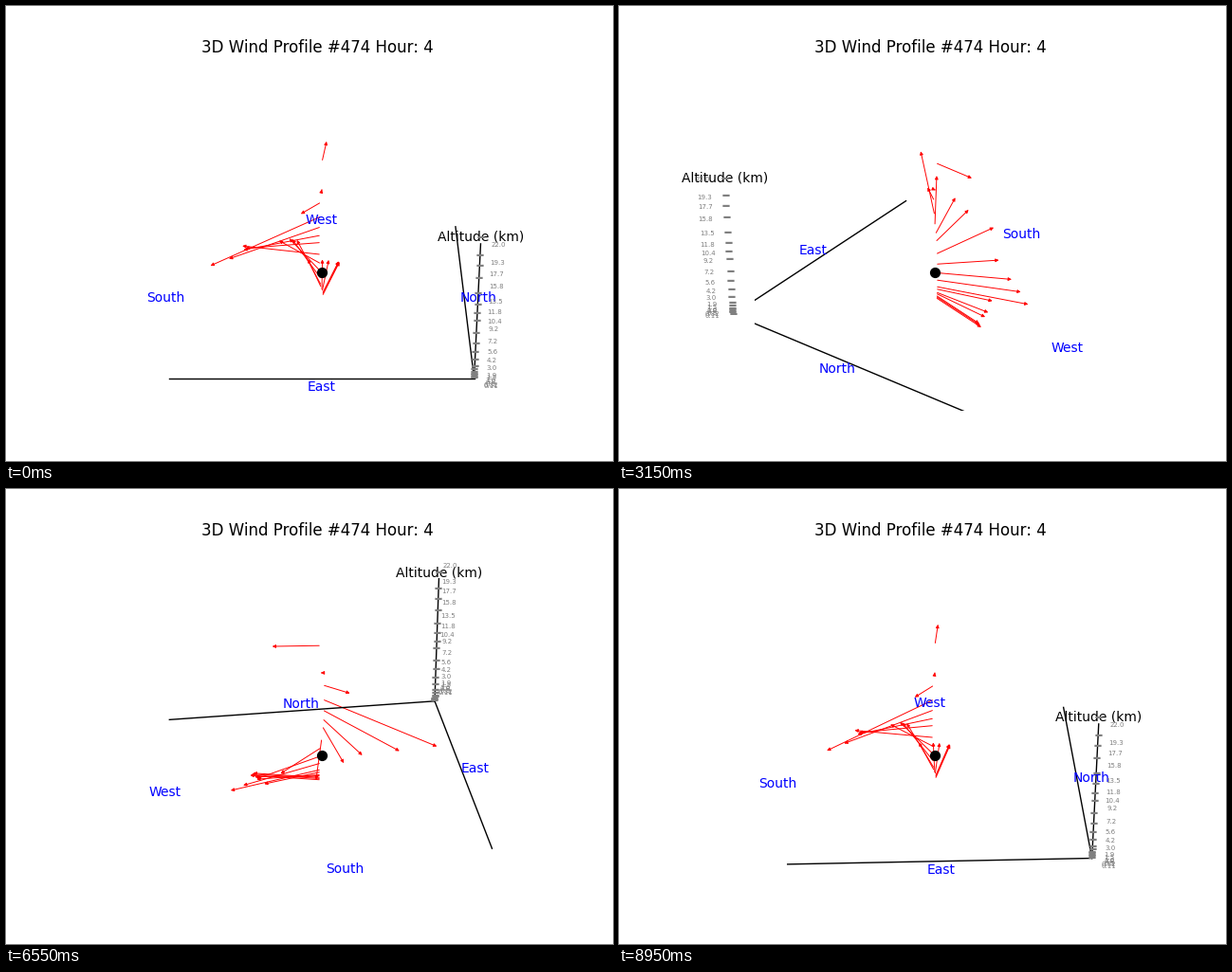
Recreate the animation shown at these times as a matplotlib script. Size 640 px wide and 480 px high, loop 9 s.

```python
import numpy as np
import matplotlib.pyplot as plt
from matplotlib.animation import FuncAnimation
from matplotlib.patches import FancyArrowPatch

FRAMES, INTERVAL = 180, 50
DIST, ELEV = 10, np.radians(30)
HALF = 0.767                      # half side of the ground square
RIM = 1.1 * HALF                  # distance of the labels
GROUND, PER_KM = -0.4139, 0.0374  # height of 0 km, and of each km

ALTS = [0.11, 0.32, 0.5, 0.8, 1.0, 1.5, 1.9, 3.0, 4.2, 5.6, 7.2, 9.2,
        10.4, 11.8, 13.5, 15.8, 17.7, 19.3, 22.0]
TOP = ALTS[-1]

# key points by altitude: the wind turns with height and peaks in the jet
SPEED = [(0, .41), (1.5, .345), (1.9, .54), (5.6, .36), (7.2, .45),
         (10, .41), (13.5, .77), (16.5, .01), (19.3, 0), (22, .27)]
HEADING = [(.5, 165), (1.5, 194), (5, 210), (7.2, 258), (12, 307),
           (15.8, 320), (17, 174)]


def wind(alt):
    """East and north parts of the wind."""
    speed = np.interp(alt, *zip(*SPEED))
    angle = np.radians(np.interp(alt, *zip(*HEADING)))
    return speed * np.cos(angle), speed * np.sin(angle)


def project(x, y, alt, azim):
    """Perspective view of a point, in axes units."""
    z = GROUND + PER_KM * alt
    toward = x * np.cos(azim) + y * np.sin(azim)
    right = y * np.cos(azim) - x * np.sin(azim)
    up = z * np.cos(ELEV) - toward * np.sin(ELEV)
    depth = DIST - toward * np.cos(ELEV) - z * np.sin(ELEV)
    return right / depth, up / depth


fig = plt.figure(figsize=(6.4, 4.8), dpi=100)
ax = fig.add_axes([0.22375, 0.11, 0.5775, 0.77])
ax.set_xlim(-0.095, 0.09)
ax.set_ylim(-0.095, 0.09)
ax.axis("off")
ax.set_title("3D Wind Profile #474 Hour: 4")

edges, arrows, labels = [], [], []


def add_label(text, x, y, alt, **style):
    label = ax.text(0, 0, text, ha="center", va="center", **style)
    labels.append((label, (x, y, alt)))


for end in [(-HALF, HALF, 0), (HALF, -HALF, 0), (HALF, HALF, TOP - 1)]:
    line, = ax.plot([], [], color="black", lw=1)
    edges.append((line, end))

for alt in ALTS:
    east, north = wind(alt)
    if east or north:
        arrow = FancyArrowPatch((0, 0), (0.01, 0), arrowstyle="-|>",
                                mutation_scale=5, lw=0.7, color="red")
        ax.add_patch(arrow)
        arrows.append((arrow, (east, north, alt)))

ax.scatter(*project(0, 0, 4.2, 0), s=50, color="black", zorder=4)

for i, name in enumerate(["East", "North", "West", "South"]):
    turn = i * np.pi / 2
    add_label(name, RIM * np.cos(turn), RIM * np.sin(turn), 0, color="blue")
add_label("Altitude (km)", HALF, HALF, TOP, color="black")
for alt in ALTS:
    add_label("-", HALF, HALF, alt, color="gray", fontsize=20)
    add_label(str(alt), RIM, RIM, alt, color="gray", fontsize=5)


def update(frame):
    azim = 2 * np.pi * frame / FRAMES
    corner = project(HALF, HALF, 0, azim)
    for line, end in edges:
        line.set_data(*zip(corner, project(*end, azim)))
    for arrow, tip in arrows:
        arrow.set_positions(project(0, 0, tip[2], azim), project(*tip, azim))
    for label, point in labels:
        label.set_position(project(*point, azim))
    return []


anim = FuncAnimation(fig, update, frames=FRAMES, interval=INTERVAL,
                     repeat=True, repeat_delay=0)
plt.show()
```
